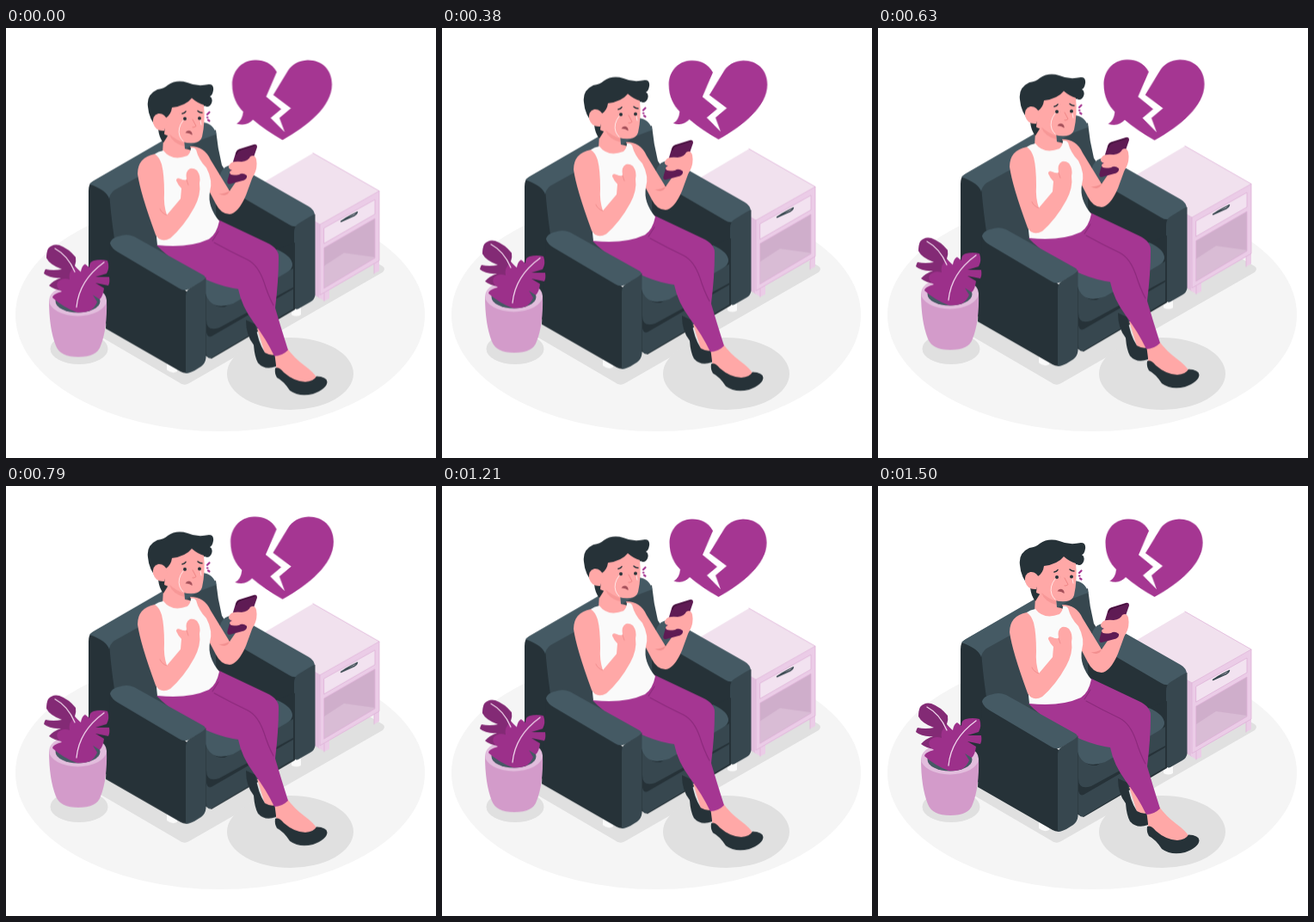
These frames come from a looping animation (500 px wide and 500 px high, 1.54 s). An HTML page:

```html
<!DOCTYPE html>
<html lang="en">
<head>
<meta charset="utf-8">
<title>Heartbreak</title>
<style>
  html, body { margin: 0; width: 100%; height: 100%; overflow: hidden; background: #fff; }
  svg { display: block; width: 100%; height: 100%; }
  #heart { transform-origin: 321px 84px; }
  .dark { fill: #263238; }
  .mid { fill: #37474f; }
  .light { fill: #455a64; }
  .skin { fill: #ffa8a7; }
  .blush { fill: #f28f8f; }
  .plum { fill: #a53692; }
  .shade { fill: #e0e0e0; }
  .line { fill: none; stroke-linecap: round; stroke-linejoin: round; }
</style>
</head>
<body>
<svg viewBox="0 0 500 500">
  <ellipse cx="249" cy="333.5" rx="238" ry="135.5" fill="#f5f5f5"/>
  <g class="shade">
    <ellipse cx="85" cy="373" rx="33.5" ry="18"/>
    <path d="M100 353L201 412Q207 417 213 413L438 284Q442 280 438 277L400 255L150 300Z"/>
    <ellipse cx="330.5" cy="402" rx="73.5" ry="42"/>
  </g>

  <g id="room">
    <g id="cabinet">
      <path d="M291 185L365 229V315L359 311L291 270Z" fill="#e3bfde"/>
      <path d="M365 229L434 190V283L428 286V275L376 305V315L370 318L364 314Z" fill="#ebcce7"/>
      <path d="M357 146L434 190L365 229L291 185Z" fill="#f1e1ee"/>
      <path d="M370 233L429 200V217L370 251Z" fill="#f2e2f0"/>
      <path d="M370 256L429 222V268L370 303Z" fill="#cfaecb"/>
      <path d="M370 303V277L393 262L429 267V268Z" fill="#d9bcd5"/>
      <path class="line" d="M291 185L365 229L434 190V271L365 311V229M357 146L434 190M370 233L429 200V217L370 251ZM370 256L429 222V268L370 303ZM370 318V309M428 286V275" stroke="#dfb3d9" stroke-width=".8"/>
      <path class="line" d="M389.500 225.500Q391 223.500 408.500 214.500Q408 217 405 218.500Z" stroke="#37474f" stroke-width="1.4"/>
    </g>

    <g id="chair">
      <path d="M187 388V398Q193 403 199 400V390ZM332 322V334Q338 337 343 334V320Z" fill="#fafafa"/>
      <path class="dark" d="M96 190Q96 181 101 179L180 134L200 180V320L125 350L96 330Z"/>
      <path class="mid" d="M120 192L183 150L226 128L244 119Q246 140 251 160L264 180V300L135 300Q123 235 120 192Z"/>
      <path class="light" d="M97 182Q99 180 102 178L184 130.500L228 110Q241 111 244.500 124L226 131L180 159L126 189Q121 193 120 199Q117 189 97 182Z"/>
      <path class="dark" d="M243 172L265 165L337 228V285L300 280L245 240Z"/>
      <path class="light" d="M247 178Q250 160 263 160Q268 160 273 163L352 208Q359 212 359 219L341 230Q335 233 329 229L257 187Q250 183 247 178Z"/>
      <path class="mid" d="M335 238Q335 231 340 228L353 220Q358 217 359.500 217V311Q359 316 354 319L340 327Q335 329 335 324Z"/>
      <path class="dark" d="M228 290L336 250V328L239 385L228 380Z"/>
      <path class="mid" d="M233 303Q236 326 254 325L334 280V302L248 349Q233 354 233 340Z"/>
      <path class="light" d="M230 288Q250 295 284 285L315 258Q333 266 333 276Q333 281 326 285L264 321Q238 330 232 309Z"/>
      <path class="mid" d="M239 359L334 304V327L239 384Q233 386 233 378V354Q234 361 239 359Z"/>
    </g>

    <g id="woman">
      <path class="skin" d="M292 350L304 349L313 381L302 383Q298 368 292 350Z"/>
      <path class="dark" d="M279 340L290 345Q293 366 301 378Q308 382 314 380V394Q301 399 293 390Q289 383 288 369Q279 358 279 340Z"/>
      <path class="skin" d="M312 377L327 373Q335 384 347 393Q358 401 362 408L346 416L315 403Q314 391 312 377Z"/>
      <path class="dark" d="M313 396Q317 394 323 401Q335 411.500 348 412Q358 411 361 405.500Q373 406 373.500 412Q373 420 357 426Q341 430 330 422Q323 411 315 407Q312 402 313 396Z"/>
      <path class="plum" d="M246 223L303 250Q318 257 317 268Q317 294 313 326Q320 350 328 375Q321 382 312 382Q303 363 288 343Q274 324 270 304Q236 299 207 278Q187 266 175 253Z"/>
      <path class="line" d="M240 248L247 237M242 250Q262 261 281 270Q293 276 300 296Q305 312 311 323" stroke="#8c2a7c" stroke-width="1.1"/>

      <path class="skin" d="M184 112L207 130L208 141Q217 142 219 147Q201 162 182 146Z"/>
      <path class="skin" d="M214 138Q231 138 238 154L260 190L271 174L279 160L290 152Q293 164 287 173L279 195Q270 216 260 217Q250 217 244 205L231 180Z"/>
      <path class="blush" d="M247 193Q252 194 260 190Q257 198 247 193Z"/>
      <path d="M173 147Q177 144 183 143Q193 156 211 149Q215 145 215 140Q219 139 221 142Q224 154 233 163Q241 178 237 191Q234 208 248 225Q245 240 236 246Q212 257 176 253Q170 195 167 180Z" fill="#fafafa"/>
      <path class="skin" d="M173 147Q153 151 153 170Q156 192 174 241Q180 251 191 245Q207 231 219 209Q227 194 225 181Q227 173 222 166Q218 163 214 164Q208 167 210 177Q207 178 203 176Q198 174 198 178Q200 183 204 187L203 199L187 218Q183 206 184 192Q184 171 181 159Q178 150 173 147Z"/>
      <path class="line" d="M187 218Q181 216 179 211M210 177L212 183" stroke="#f28f8f" stroke-width="1"/>

      <path d="M267 146Q268 142 272 141L288 136Q292 135 292 139L280 174Q279 177 275 178L260 182Q256 182 258 176Z" fill="#5f1b54"/>
      <path class="line" d="M268 147Q269 143 273 142L289 137" stroke="#3f1038" stroke-width="1.3"/>
      <path class="skin" d="M261 158Q264 155 274 156Q282 155 284 150Q289 147 291 153Q293 163 288 172L281 182L280 172Q275 168 271 171Q260 173 260 168Q261 166 263 166Q258 164 259 161Z"/>

      <path class="dark" d="M165 92Q163 78 176 72Q184 71 188 67Q198 60 211 64Q222 69 236 66Q242 66 241 73Q240 79 237 80Q241 82 239 88Q236 94 231 91L198 110L183 134Q178 128 177 118Q166 107 165 92Z"/>
      <path class="skin" d="M186 105Q192 101 193 93Q209 91 216 82Q223 88 230 90Q232 108 228 127Q226 133 219 134Q207 135 198 130L184 124Z"/>
      <path class="blush" d="M190 124Q198 131 207 134L207 138Q193 134 190 124Z" opacity=".65"/>
      <path class="skin" d="M188 108Q184 99 177 100Q170 102 171 111Q174 121 184 120Z"/>
      <path class="line" d="M205 100Q208 99.500 209 97.500M223 97Q225 99 228 99" stroke="#263238" stroke-width="1.6"/>
      <g class="dark"><circle cx="208" cy="106" r="2"/><circle cx="225" cy="105.500" r="2"/></g>
      <path class="line" d="M217 107L221 114.500Q219 116.500 217 116" stroke="#ef8585" stroke-width="1"/>
      <path d="M208.500 122.500Q210 119 214 120Q217 121.500 216.500 125Q213 122 208.500 122.500Z" fill="#a4505a"/>
      <path class="line" d="M206 108Q199 117 202 126Q203 129 206 132M226 108L227 113" stroke="#fff" stroke-width=".9" opacity=".8"/>
      <path class="line" d="M234 101L236.500 98.500M234 104.500H234.500M235 107.500L236.500 108.500" stroke="#a53692" stroke-width="2.2"/>
    </g>

    <g id="armrest">
      <path class="dark" d="M121 251Q126 248 132 255L205 302L213 310V401Q208 403 203 400L116 350Z"/>
      <path class="light" d="M121 251Q122 243 140 241Q144 241 149 243L228 287Q234 290 231 294L213 304Q207 307 201 303L130 261Q123 257 121 251Z"/>
      <path class="mid" d="M209 312Q209 306 214 303L226 296Q232 292 232.500 290V384Q232 390 227 394L219 399Q213 402 209 402Z"/>
    </g>

    <g id="plant">
      <path d="M50 317Q50 350 58 370Q63 383 84 383Q106 383 110 370Q118 350 117 317Z" fill="#d39bca"/>
      <ellipse cx="83.500" cy="317" rx="33.500" ry="18.500" fill="#e2bddd"/>
      <ellipse cx="83.500" cy="318" rx="26" ry="13.500" class="light"/>
      <path d="M49 257Q54 251 62 253Q73 257 81 267Q82 272 80 277L86 284L88 300L66 306Q56 305 50 300Q55 294 64 291Q51 292 44 286Q45 282 46 281Q55 283 65 281Q51 276 47 268Q47 261 49 257Z" fill="#832a75"/>
      <path d="M118 271Q121 279 117 286L104 290L120 290Q121 296 119 300L104 297L114 303Q113 312 109 316L101 311L106 319Q103 326 98 329Q90 332 82 331Q66 325 54 314Q54 310 65 307Q57 302 60 296Q66 290 74 293Q72 284 80 278L87 284Q88 277 92 275L97 279Q97 272 102 271Q110 269 118 271Z" fill="#9c308a"/>
      <path class="line" d="M57 257Q72 265 80 284M114 273Q85 294 82 325" stroke="#f0d7ec" stroke-width="1.3"/>
    </g>
  </g>

  <path id="heart" class="plum" d="M315 52C309 41 299 38 290 38.500C274 39 264.500 52 264.500 66C264.500 80 270 90 277 97Q276 107 269.500 110.500Q281 114 288 106Q302 118 321.500 129C350 113 377.500 91 377.500 66C377.500 49 366 38.500 350 38.500C339 39 332 44 328 50L311 78L331 93L318 104L324 120L308 104L320 94L303 80Z"/>
</svg>
<script>
  const timing = { duration: 1540, delay: -40, iterations: Infinity, easing: 'linear' };
  const play = (id, frames) => document.getElementById(id).animate(frames, timing);

  play('room', [0, -10, 0].map(y => ({ transform: `translateY(${y}px)` })));

  const beat = [[0, 1], [.1, 1.1], [.3, 1], [.4, 1], [.5, 1.1], [.6, 1], [1, 1]];
  play('heart', beat.map(([offset, s]) => ({ offset, transform: `scale(${s})` })));
</script>
</body>
</html>
```
